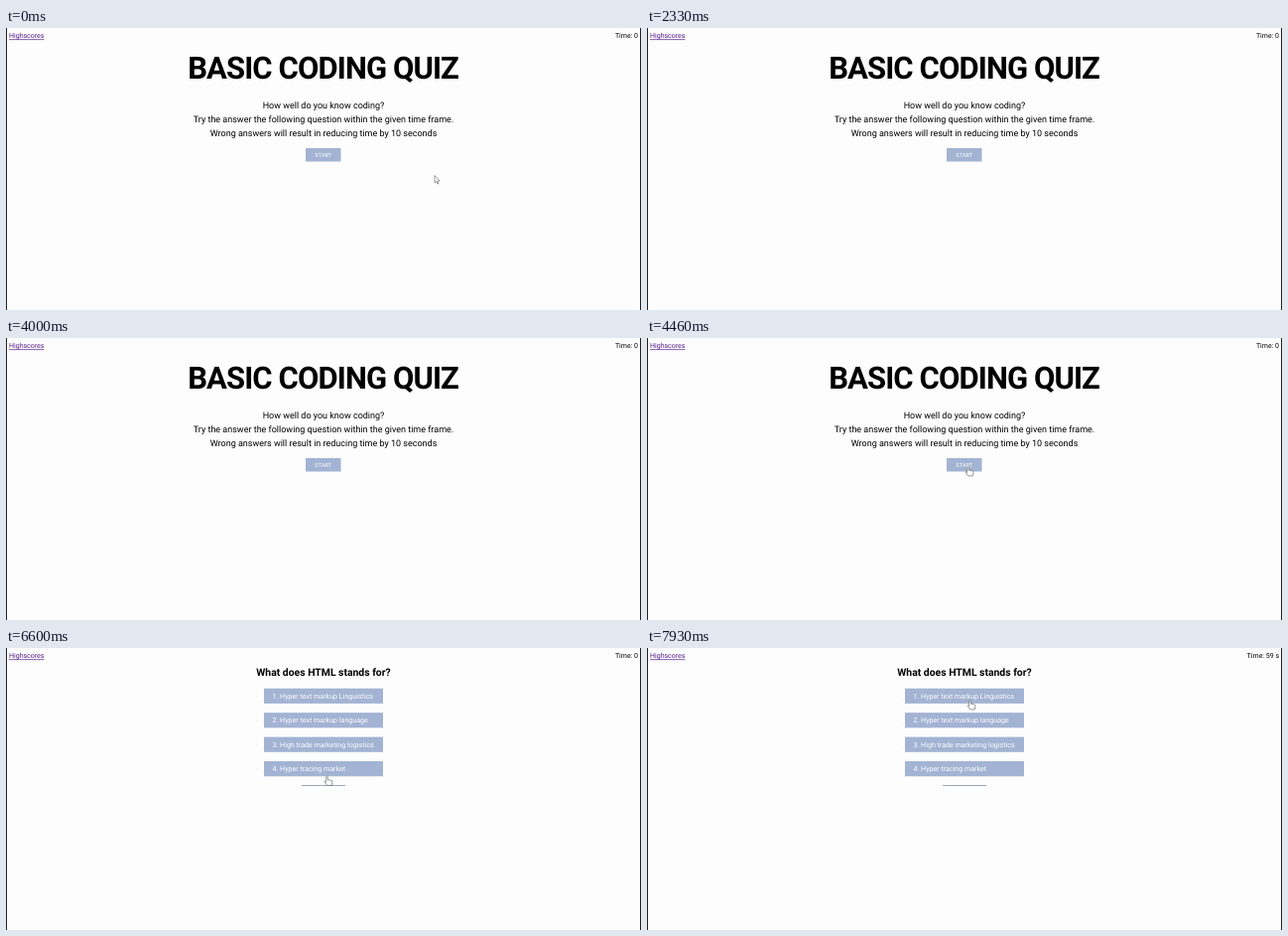
An HTML page for the animation above (8 s loop, 640x284 px).

```html
<!DOCTYPE html>
<html lang="en">
<head>
<meta charset="utf-8">
<title>Coding quiz</title>
<style>
  html, body { margin: 0; width: 100%; height: 100%; overflow: hidden; background: #fdfdfd; }
  svg { display: block; width: 100vw; height: 100vh; }
  text { font: 9px Roboto, "Liberation Sans", sans-serif; text-rendering: geometricPrecision; }
  .mid { text-anchor: middle; }
  .title { font-size: 31px; font-weight: 600; letter-spacing: -0.9px; }
  .ask { font-size: 10.4px; font-weight: 600; }
  .bar { font-size: 7px; }
  .box { fill: #a3b3d3; }
  .label { fill: #fff; font-size: 7.1px; }
  .start { fill: #fff; font-size: 5.7px; }
  .link { fill: #551a8b; text-decoration: underline; }
  .cursor path { fill: #fff; stroke: #555; stroke-width: .6; stroke-linejoin: round; }
</style>
</head>
<body>
<svg viewBox="0 0 640 284">
  <path d="M.5 0V284M639.5 0V284" stroke="#222"/>
  <text class="bar link" x="3" y="10.4">Highscores</text>
  <text class="bar" id="time" x="637" y="10.4" text-anchor="end">Time: 0</text>

  <g id="intro">
    <text class="mid title" x="319.6" y="51">BASIC CODING QUIZ</text>
    <text class="mid" x="320" y="81">How well do you know coding?</text>
    <text class="mid" x="320" y="94.8">Try the answer the following question within the given time frame.</text>
    <text class="mid" x="320" y="108.5">Wrong answers will result in reducing time by 10 seconds</text>
    <rect class="box" x="302" y="121" width="35.5" height="13.5"/>
    <text class="mid start" x="319.8" y="130">START</text>
  </g>

  <g id="quiz">
    <text class="mid ask" x="320" y="27.5">What does HTML stands for?</text>
    <path d="M298 138.5H342" stroke="#8f9bb3" stroke-width=".9"/>
  </g>

  <g class="cursor" id="arrow"><path d="M0 0V7.4L1.7 5.9L2.9 8.6L4 8.1L2.9 5.5H5.1Z"/></g>
  <g class="cursor" id="hand">
    <path d="M-.8 .6Q0-.5 .8 .6V3.6L4.6 4.4Q5.6 4.8 5.4 6L4.8 9.4H.2L-2.2 6.2Q-2.6 5 -1.6 5.2L-.8 5.9Z"/>
  </g>
</svg>
<script>
const $ = id => document.getElementById(id);
const LOOP = 8000, STEP = 1000 / 15, CLICK = 6600;

const answers = [
  "Hyper text markup Linguistics",
  "Hyper text markup language",
  "High trade marketing logistics",
  "Hyper tracing market"
];
const rowTop = i => 40.7 + i * 24.45;

$("quiz").innerHTML += answers.map((answer, i) => {
  const y = rowTop(i);
  return `<circle cx="253" cy="${y + 7.8}" r=".8" fill="#eee"/>
    <rect class="box" x="260" y="${y}" width="120" height="15.2"/>
    <text class="label" x="268.5" y="${y + 10.2}">${i + 1}. ${answer}</text>`;
}).join("");

// Pointer keys: time, x, y; each row with no x hides the pointer.
const path = [
  [0, 432, 148.5], [60, 432, 148.5], [390, 326, 129], [395],
  [3730, 327, 135], [3930, 325, 131], [3990],
  [4200, 326, 130], [4460, 323.5, 129.5], [7060, 323.5, 129],
  [7330, 326.5, 85], [7600, 326, 66], [7930, 325.5, 52.5], [LOOP, 325.5, 52.5]
];

function pointer(t) {
  const i = path.findIndex((key, n) => n + 1 === path.length || t < path[n + 1][0]);
  const [t0, x0, y0] = path[i];
  const [t1, x1, y1] = path[i + 1] || path[i];
  if (x0 === undefined) return null;
  if (x1 === undefined || t1 === t0) return { x: x0, y: y0 };
  const k = (t - t0) / (t1 - t0);
  return { x: x0 + (x1 - x0) * k, y: y0 + (y1 - y0) * k };
}

const within = (v, from, size) => v >= from && v <= from + size;

function overButton({ x, y }, playing) {
  return playing
    ? within(x, 260, 120) && answers.some((_, i) => within(y, rowTop(i), 15.2))
    : within(x, 302, 35.5) && within(y, 121, 13.5);
}

const show = (el, on) => el.style.display = on ? "" : "none";

function draw(now) {
  // The picture advances 15 times a second.
  const t = Math.floor((now % LOOP + 7) / STEP) * STEP;
  const playing = t > CLICK - 10;
  show($("intro"), !playing);
  show($("quiz"), playing);

  const seconds = Math.floor((t - CLICK + 10) / 1000);
  $("time").textContent = seconds > 0 ? `Time: ${60 - seconds} s` : "Time: 0";

  const p = pointer(t);
  // The hand stays on after the click until the pointer moves.
  const hand = p && (overButton(p, playing) || (playing && t < 7060));
  show($("hand"), hand);
  show($("arrow"), p && !hand);
  if (p) $(hand ? "hand" : "arrow").setAttribute("transform", `translate(${p.x} ${p.y})`);
}

function tick(now) {
  draw(now);
  requestAnimationFrame(tick);
}
requestAnimationFrame(tick);
</script>
</body>
</html>
```
